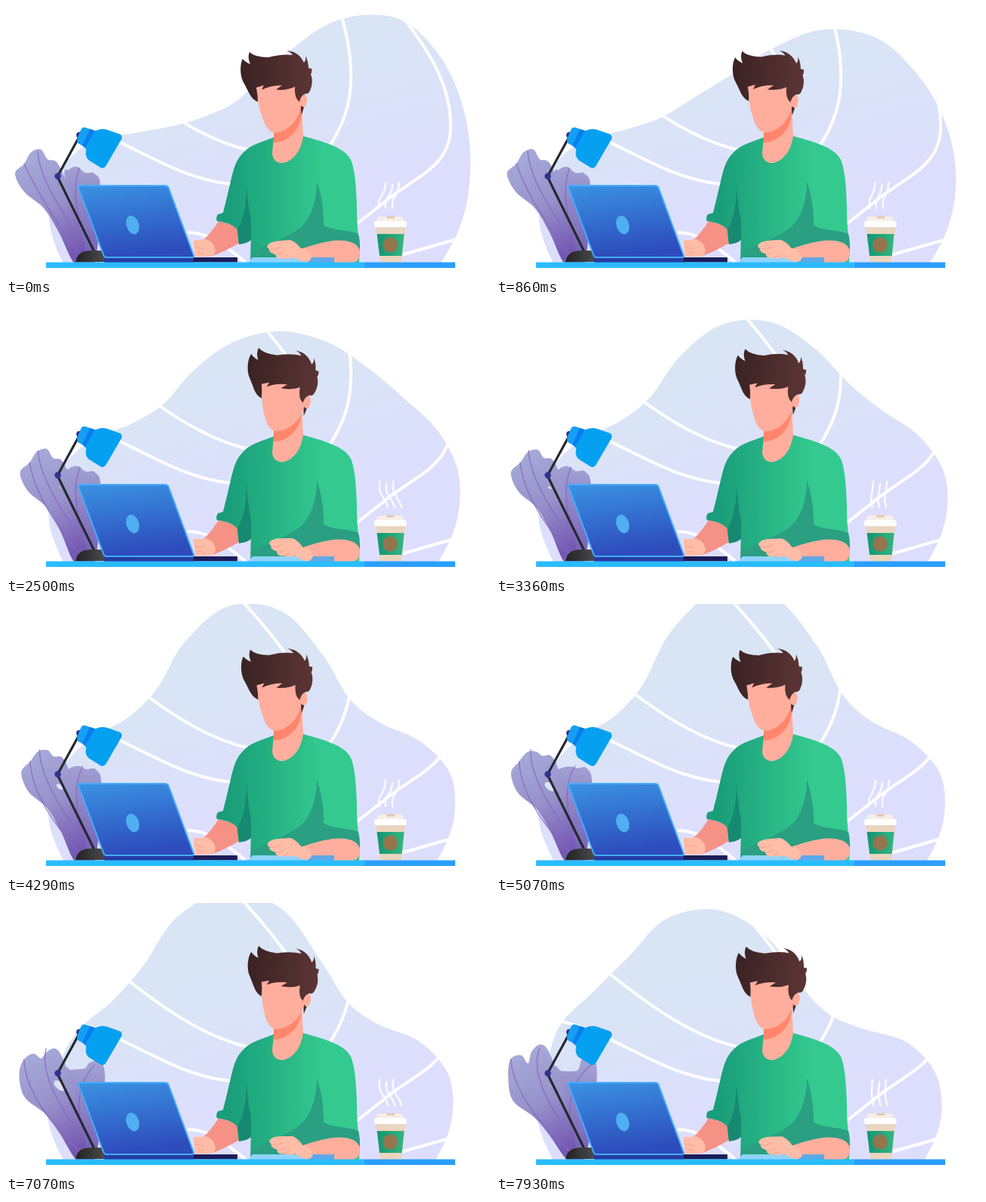
An HTML page that plays this animation: 640x359 px, repeating every 8000 ms.

```html
<!DOCTYPE html>
<html lang="en">
<head>
<meta charset="utf-8">
<title>Man at a desk</title>
<style>
html, body { margin: 0; width: 100%; height: 100%; overflow: hidden; background: #fff; }
svg { display: block; width: 100%; height: 100%; }
.line { fill: none; stroke: #fff; stroke-width: 4; }
.vein { fill: none; stroke: #8467bd; stroke-width: 1.5; stroke-linecap: round; opacity: .75; }
.steam { fill: none; stroke: #fff; stroke-width: 2.5; stroke-linecap: round; opacity: .85; }
.arm { fill: none; stroke: #26292f; stroke-width: 3.2; stroke-linejoin: round; }
.crease { fill: none; stroke: #f3a18e; }
</style>
</head>
<body>
<svg viewBox="0 0 640 359" preserveAspectRatio="none">
  <defs>
    <linearGradient id="sky" gradientUnits="userSpaceOnUse" x1="300" y1="90" x2="350" y2="285">
      <stop offset="0" stop-color="#d9e5f5"/><stop offset="1" stop-color="#dddefd"/>
    </linearGradient>
    <linearGradient id="leaf" gradientUnits="userSpaceOnUse" x1="35" y1="200" x2="95" y2="325">
      <stop offset="0" stop-color="#a6a9d8"/><stop offset=".5" stop-color="#9791cb"/><stop offset="1" stop-color="#7558b3"/>
    </linearGradient>
    <linearGradient id="back" gradientUnits="userSpaceOnUse" x1="105" y1="210" x2="100" y2="325">
      <stop offset="0" stop-color="#a3a3d3"/><stop offset="1" stop-color="#7763b8"/>
    </linearGradient>
    <linearGradient id="shirt" gradientUnits="userSpaceOnUse" x1="295" y1="0" x2="420" y2="0">
      <stop offset="0" stop-color="#1a9e7a"/><stop offset="1" stop-color="#34ca8f"/>
    </linearGradient>
    <linearGradient id="hair" x1="0" x2="1">
      <stop offset="0" stop-color="#3a2223"/><stop offset="1" stop-color="#5c3535"/>
    </linearGradient>
    <linearGradient id="lid" x1="0" y1="0" x2=".2" y2="1">
      <stop offset="0" stop-color="#3a92e2"/><stop offset="1" stop-color="#2d4dbd"/>
    </linearGradient>
    <linearGradient id="sleeve" x1="0" x2="1">
      <stop offset="0" stop-color="#119673"/><stop offset="1" stop-color="#35b580"/>
    </linearGradient>
    <linearGradient id="base" x1="0" x2="1">
      <stop offset="0" stop-color="#222"/><stop offset="1" stop-color="#4a4a4d"/>
    </linearGradient>
    <clipPath id="above"><path d="M0 0H640V340H0Z"/></clipPath>
    <clipPath id="inside"><path id="mask"/></clipPath>
  </defs>

  <g clip-path="url(#above)">
    <path id="blob" fill="url(#sky)"/>
    <g clip-path="url(#inside)" class="line">
      <path d="M443 12C459 62 460 112 448 145Q440 168 426 188"/>
      <path d="M527 18C566 68 589 112 588 162C586 215 540 226 500 260L462 290"/>
      <path d="M146 90C205 138 262 178 322 191"/>
      <path d="M84 156C165 176 215 227 298 236"/>
      <path d="M240 300C270 300 290 318 316 339"/>
      <path d="M312 -4Q350 37 376 75"/>
      <path d="M522 330L620 302"/>
    </g>
    <path id="leaf2" fill="url(#back)"/>
    <path id="leaf1" fill="url(#leaf)"/>
    <ellipse id="gap" rx="11" ry="6" fill="#dbe2f8"/>
    <g id="veins"></g>
  </g>

  <g id="lamp">
    <path class="arm" d="M117 326L68 226L98 171"/>
    <circle cx="68.500" cy="225.500" r="4.200" fill="#33308f"/>
    <circle cx="97" cy="171" r="4" fill="#33308f"/>
    <path fill="url(#base)" d="M92 339Q94 324 112 324H130V339Z"/>
    <path fill="#159ff3" d="M94 176L99 164Q101 160 105 161L117 165L107 188L97 183Q93 181 94 176Z"/>
    <path fill="#0a7cf0" d="M111 163L120 166L108 191L101 185Z"/>
    <path fill="#05a0f0" d="M117 166Q125 161 134 164L151 170Q154 172 153 176L132 212Q129 216 125 214L109 204Q104 199 106 191L105 187Z"/>
  </g>

  <g id="cup">
    <g id="steam"></g>
    <path fill="#ead5bf" d="M489 292H528L523 340H495Z"/>
    <path fill="url(#sleeve)" d="M490.500 302H526.500L523.500 331H494Z"/>
    <circle cx="508" cy="316.500" r="10" fill="#94754e"/>
    <path fill="#f6efe8" d="M492 279H524L527 286H489Z"/>
    <rect x="503" y="278.500" width="11" height="3" rx="1" fill="#e5c9ad"/>
    <rect x="487" y="285" width="42.500" height="8" rx="2" fill="#fff"/>
  </g>

  <g id="man">
    <path fill="#f69186" d="M281 285L307 292L308 314Q290 325 273 331L260 311Q272 300 281 285Z"/>
    <path fill="url(#shirt)" d="M354 174C338 180 322 185 315 193C304 203 301 216 298 228C294 246 290 262 287 274L280 276Q277 281 279 285Q301 288 306 297L308 316Q317 314 324 304L323 340H467L468 320C465 300 464 285 464 268C463 240 462 222 457 206C450 188 424 181 392 172Z"/>
    <path fill="#168970" d="M318 238Q320 265 324 286L324 310Q317 316 308 315L306 297Q318 275 318 238Z"/>
    <path fill="#2a9f82" d="M411 232Q421 262 420 290C430 298 452 296 466 302Q468 309 468 322L425 314L385 334H324L325 327C352 312 378 306 395 288Q411 266 411 232Z"/>
    <path fill="#ffae9d" d="M354 164V175Q353 184 352 196Q354 209 367 208Q388 202 393 173L391 132Z"/>
    <path fill="#ff866c" d="M354 161L391 133Q392 153 383 165Q372 180 354 181Z"/>
    <g id="head">
      <path fill="#4a2b2b" d="M389 130L394 134L391 144Z"/>
      <path fill="#ffae9d" d="M331 100Q331 128 340 151Q346 168 357 168C374 166 390 149 391 126L388 98Z"/>
      <ellipse cx="393.500" cy="125" rx="4.700" ry="9" fill="#ffae9d"/>
      <path fill="url(#hair)" d="M333 127C323 123 321 113 315 103C309 94 309 77 313 70Q316 74 323 77Q319 68 322 61Q329 68 347 68Q365 63 379 65Q377 61 371 59Q387 60 394 75Q397 72 396 66Q400 74 400 82Q404 84 404 82Q405 88 403 90Q407 101 402 112Q400 117 396 116Q390 118 388 127Q381 122 382 107Q372 112 357 111L365 105Q350 105 338 111L341 105Q334 107 331 108Q333 118 333 127Z"/>
    </g>
    <path fill="#ffae9d" d="M380 325C402 318 428 308 449 311Q467 314 468 326Q468 340 456 340H404Q391 336 380 325Z"/>
    <path fill="#8fd4fb" d="M326 333H400V340H320Z"/>
    <path fill="#5fa8e8" d="M399 333H434V340H399Z"/>
    <g id="hand">
      <path fill="#ffbca6" d="M346 317Q349 312 362 311L376 310Q384 313 390 321Q401 321 404 333Q402 339 397 339Q389 338 380 333Q373 336 366 334Q357 336 356 329Q347 327 348 322Q344 320 346 317Z"/>
      <path class="crease" d="M349 323Q358 323 364 319M357 330Q364 329 368 325M367 334L373 330"/>
    </g>
  </g>

  <g id="desk">
    <path fill="#263ca4" d="M130 333H249V340H130Z"/>
    <path fill="#1b1d5a" d="M248 333H306V339.500H248Z"/>
    <path fill="#ffbca6" d="M248 313Q247 309 253 310L265 309Q277 314 277 325Q275 333 267 332H250Z"/>
    <path class="crease" d="M250 319Q257 322 263 321M253 326L262 328"/>
    <path fill="url(#lid)" stroke="#43acff" stroke-width="2" d="M96 241Q95 238 99 238H210Q214 238 215 241L248 330Q249 333 246 333H133Q130 333 129 330Z"/>
    <ellipse cx="167.500" cy="290" rx="8.300" ry="12.500" fill="#50aff0" transform="rotate(-18 167.500 290)"/>
    <path fill="#29bcff" d="M53 339.500H474V347H53Z"/>
    <path fill="#2a9fff" d="M474 339.500H594V347H474Z"/>
  </g>
</svg>
<script>
const LOOP = 8000, TURN = 4290, SWING = 4730;
const $ = id => document.getElementById(id);
const mix = (a, b, u) => a + (b - a) * u;
const mixAll = (a, b, u) => a.map((v, i) => mix(v, b[i], u));

// Blob radii around (330, 340), every 12 degrees from right to left.
const RIGHT = [245, 280, 311, 341, 366, 374, 336, 267, 217, 205, 210, 232, 270, 287, 279, 255];
const TALL = [240, 268, 282, 269, 246, 248, 287, 332, 339, 304, 262, 254, 272, 285, 280, 254];
const LEFT = [237, 264, 276, 264, 233, 222, 241, 294, 332, 336, 310, 300, 303, 290, 282, 255];

// Leaf outlines at the start and the end, as x, y pairs.
const LEAF1 = [
  [12,222, 24,209, 33,194, 46,190, 55,203, 66,206, 76,224, 92,270, 107,338, 90,340, 70,300, 50,268, 24,246],
  [16,230, 19,207, 33,202, 42,213, 47,196, 60,187, 73,204, 95,270, 107,338, 94,340, 70,307, 50,284, 22,262]
];
const LEAF2 = [
  [78,230, 83,217, 94,213, 105,221, 117,222, 125,243, 118,338, 98,340],
  [78,225, 88,223, 108,222, 114,207, 130,206, 133,240, 118,338, 96,340]
];

// Closed Catmull-Rom curve through flat x, y pairs.
function curve(p) {
  const n = p.length / 2;
  const at = k => [p[2 * ((k + n) % n)], p[2 * ((k + n) % n) + 1]];
  const text = q => q.map(v => v.toFixed(2));
  let d = 'M' + text(at(0));
  for (let k = 0; k < n; k++) {
    const [a, b, c, e] = [at(k - 1), at(k), at(k + 1), at(k + 2)];
    const c1 = b.map((v, j) => v + (c[j] - a[j]) / 6);
    const c2 = c.map((v, j) => v - (e[j] - b[j]) / 6);
    d += `C${text(c1)} ${text(c2)} ${text(c)}`;
  }
  return d + 'Z';
}

function addPaths(parent, count) {
  return Array.from({ length: count }, () => {
    const el = document.createElementNS('http://www.w3.org/2000/svg', 'path');
    el.setAttribute('class', parent === 'veins' ? 'vein' : 'steam');
    return $(parent).appendChild(el);
  });
}
const setD = (el, d) => el.setAttribute('d', d);
const setTransform = (id, value) => $(id).setAttribute('transform', value);
const veins = addPaths('veins', 3);
const steam = addPaths('steam', 3);

// The hump first rises in the middle, then swells while it leans left.
function blobPath(t) {
  const late = Math.max(0, (t - TURN) / (7930 - TURN));
  const radii = t < TURN
    ? mixAll(RIGHT, TALL, (t / TURN) ** .9)
    : mixAll(TALL, LEFT, late ** 2);
  const swell = 36 * Math.max(0, Math.sin(Math.PI * late));
  const points = radii.flatMap((r, k) => {
    const a = k * Math.PI / 15;
    const size = r + swell * Math.exp(-(((12 * k - 88) / 20) ** 2) / 2);
    return [330 + size * Math.cos(a), 340 - size * Math.sin(a)];
  });
  return curve([...points, 110, 392, 530, 392]);
}

function drawPlant(t) {
  const u = t / LOOP, grow = u ** 3;
  const sway = 8 * Math.sin(Math.PI * u);
  const front = mixAll(...LEAF1, grow);
  const leaf1 = front.map((v, i) => i % 2 ? v : v + sway * (338 - front[i + 1]) / 120);
  const leaf2 = mixAll(...LEAF2, grow);
  setD($('leaf1'), curve(leaf1));
  setD($('leaf2'), curve(leaf2));
  setTransform('gap', `translate(71 242) rotate(40) scale(${Math.sin(Math.PI * grow)})`);

  setD(veins[0], `M${leaf1[2]} ${leaf1[3]}Q${mix(48, 24, u)} 262 98 330`);
  setD(veins[1], `M${mix(42, 58, grow)} 193Q44 228 86 290`);
  setD(veins[2], `M${mix(97, 126, grow)} 215Q84 250 104 310`);
}

function draw(t) {
  const blob = blobPath(t);
  setD($('blob'), blob);
  setD($('mask'), blob);
  drawPlant(t);

  const s = (1 - Math.cos(2 * Math.PI * t / SWING)) / 2;
  setTransform('head', `rotate(${6.3 * s} 366 170)`);
  setTransform('hand', `translate(${2 * s} 0) rotate(${4 * s} 392 328)`);

  const bend = s * s;
  steam.forEach((el, i) => {
    const x = 9 * i, top = 234 + 3 * (i % 2);
    setD(el, `M${mix(502, 494, bend) + x} ${top}` +
      `C${mix(501, 492, bend) + x} 255 ${mix(491, 500, bend) + x} 250 ${mix(493, 505, bend) + x} 268`);
  });
}

function tick() {
  draw(performance.now() % LOOP);
  requestAnimationFrame(tick);
}
tick();
</script>
</body>
</html>
```
